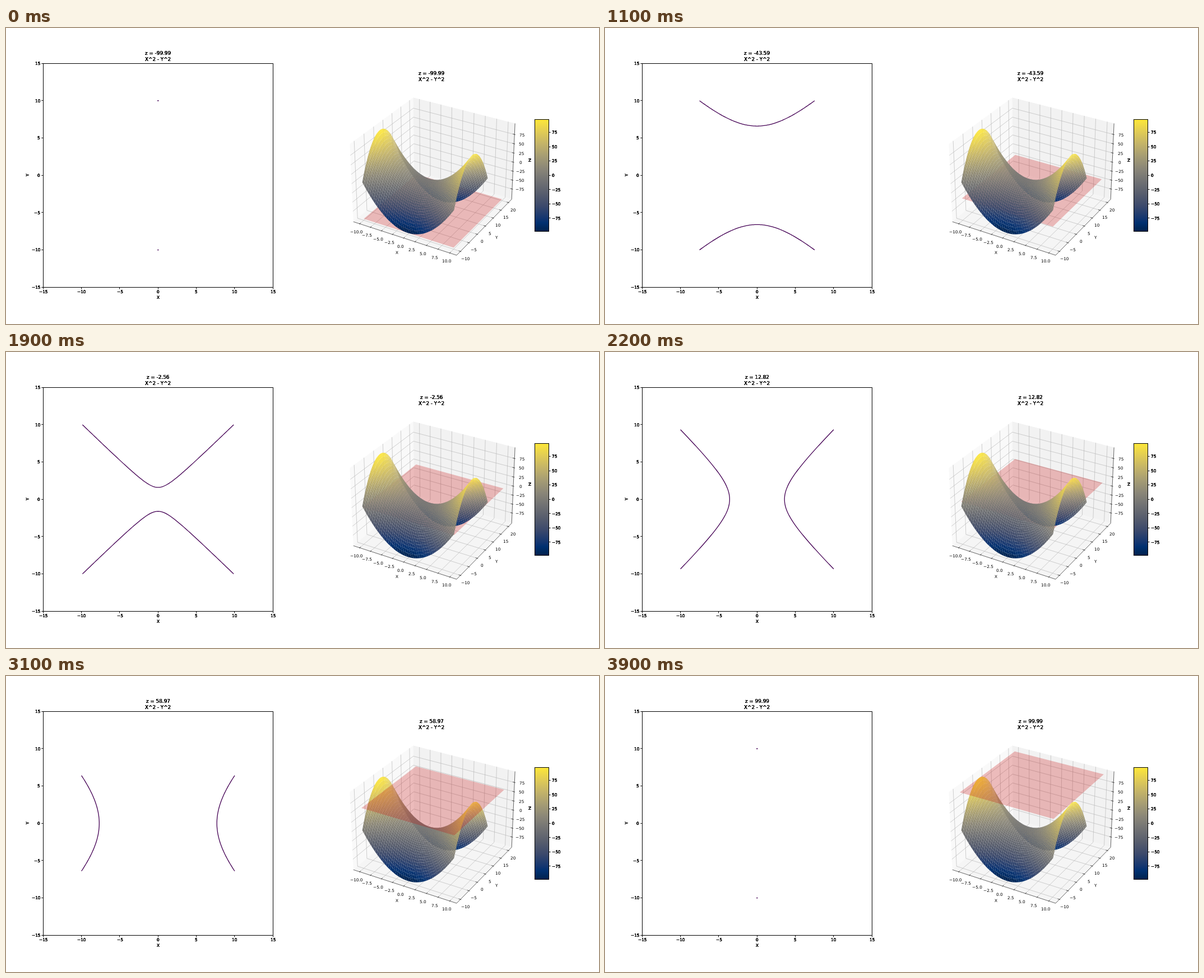
An HTML page with a canvas that plays this animation: 1058 px wide and 529 px high, repeating every 4000 ms.

```html
<!DOCTYPE html>
<html lang="en">
<head>
<meta charset="utf-8">
<title>Level curves of a saddle</title>
<style>
html, body { margin: 0; width: 100%; height: 100%; overflow: hidden; background: #fff; }
canvas { display: block; }
</style>
</head>
<body>
<canvas id="c" width="1058" height="529"></canvas>
<script>
const ctx = document.getElementById('c').getContext('2d');
const STEPS = 40, STEP_MS = 100, Z_END = 99.99;
const TICK = 7.35, TITLE = 8.82, INK = '#000';

// colour map: position, red, green, blue
const STOPS = [
  [0, 0, 34, 78], [.075, 0, 48, 112], [.111, 18, 53, 112], [.222, 59, 73, 108],
  [.333, 87, 93, 109], [.444, 112, 113, 115], [.556, 138, 134, 120],
  [.667, 165, 156, 116], [.778, 195, 179, 105], [.889, 225, 204, 85], [1, 254, 232, 56]
];
function cividis(t) {
  const k = Math.max(1, STOPS.findIndex(s => s[0] >= t));
  const a = STOPS[k - 1], b = STOPS[k], f = (t - a[0]) / (b[0] - a[0]);
  return `rgb(${[1, 2, 3].map(j => Math.round(a[j] + (b[j] - a[j]) * f))})`;
}

// 3D view: limits, box size, elevation 30 and azimuth -60 degrees
const X = 11.458, Y0 = -12.1875, Y1 = 22.1875, Z = 104.17, SIDE = 1.14288;
const C = Math.sqrt(3) / 2;
function project(x, y, z) {
  const a = x / (2 * X) * SIDE, b = (y - 5) / (Y1 - Y0) * SIDE, c = z / (2 * Z) * SIDE * .75;
  const depth = 10 - (.5 * C * a - .75 * b + .5 * c), s = 1847 / depth;
  return [763.5 + s * (C * a + .5 * b), 258.7 - s * (-.25 * a + .5 * C * b + C * c), depth];
}

function trace(points) {
  ctx.beginPath();
  points.forEach(p => ctx.lineTo(p[0], p[1]));
}
function line(points, color, width) {
  trace(points);
  ctx.strokeStyle = color;
  ctx.lineWidth = width;
  ctx.stroke();
}
function fill(points, color) {
  trace(points);
  ctx.closePath();
  ctx.fillStyle = color;
  ctx.fill();
}
const line3 = (points, color) => line(points.map(p => project(...p)), color, .6);
const fill3 = (points, color) => fill(points.map(p => project(...p)), color);

// align: 0 starts at x, .5 is centred, 1 ends at x; y is the middle of the digits
function text(s, x, y, size = TICK, align = .5, passes = 1) {
  ctx.font = `${size}px "DejaVu Sans", sans-serif`;
  ctx.fillStyle = INK;
  const left = Math.round(x - ctx.measureText(s).width * align);
  const base = Math.round(y + size * .365);
  for (let i = 0; i < passes; i++) ctx.fillText(s, left, base);
}
// repeated passes darken the soft edges of the glyphs
const heavy = (s, x, y, size, align) => text(s, x, y, size, align, 4);
const label = (v, digits = 0) => v.toFixed(digits).replace('-', '\u2212');
const range = (a, b, step) => Array.from({ length: Math.round((b - a) / step) + 1 }, (_, i) => a + i * step);

// surface facets, far to near
const grid = [...range(0, 98, 2), 99].map(i => -10 + 20 * i / 99);
const quads = [];
for (let i = 0; i < 50; i++) for (let j = 0; j < 50; j++) {
  const corners = [[i, j], [i + 1, j], [i + 1, j + 1], [i, j + 1]]
    .map(([p, q]) => [grid[p], grid[q], grid[p] ** 2 - grid[q] ** 2]);
  const points = corners.map(p => project(...p));
  quads.push({
    points,
    z: corners.reduce((s, p) => s + p[2], 0) / 4,
    depth: points.reduce((s, p) => s + p[2], 0) / 4
  });
}
quads.sort((a, b) => b.depth - a.depth);
const low = Math.min(...quads.map(q => q.z)), high = Math.max(...quads.map(q => q.z));
const nearest = Math.min(...quads.flatMap(q => q.points.map(p => p[2])));

function drawTitle(z, x, y) {
  heavy('z = ' + +z.toFixed(2), x, y, TITLE);
  heavy('X^2 - Y^2', x, y + 11, TITLE);
}

function drawContour(z) {
  const px = x => 271.3 + x * 13.667, py = y => 263.3 - y * 13.333;
  ctx.strokeStyle = INK;
  ctx.lineWidth = 1;
  ctx.strokeRect(66.5, 63.5, 410, 400);
  for (const v of range(-15, 15, 5)) {
    const x = Math.floor(px(v)) + .5, y = Math.floor(py(v)) + .5;
    line([[x, 464], [x, 466.6]], INK, 1);
    line([[66, y], [63.4, y]], INK, 1);
    heavy(label(v), px(v), 471);
    heavy(label(v), 61, py(v), TICK, 1);
  }
  heavy('X', 271.3, 481.3);
  ctx.save();
  ctx.translate(38, 263);
  ctx.rotate(-Math.PI / 2);
  heavy('Y', 0, 0);
  ctx.restore();

  // levels beyond the sampled range fall back to the lowest one
  const edge = 100 - (10 / 99) ** 2;
  const level = Math.abs(z) > edge ? -edge : z;
  const m = Math.sqrt(100 - Math.abs(level));
  for (const side of [-1, 1]) {
    line(range(-m, m, m / 50).map(u => {
      const v = side * Math.sqrt(u * u + Math.abs(level));
      return level < 0 ? [px(u), py(v)] : [px(v), py(u)];
    }), '#440154', 1.3);
  }
  drawTitle(z, 271.3, 44.7);
}

function drawBox() {
  fill3([[-X, Y0, -Z], [-X, Y1, -Z], [-X, Y1, Z], [-X, Y0, Z]], '#f9f9f9');
  fill3([[-X, Y1, -Z], [X, Y1, -Z], [X, Y1, Z], [-X, Y1, Z]], '#f2f2f2');
  fill3([[-X, Y0, -Z], [X, Y0, -Z], [X, Y1, -Z], [-X, Y1, -Z]], '#f5f5f5');

  const xs = range(-10, 10, 2.5), ys = range(-10, 20, 5), zs = range(-75, 75, 25);
  const gray = '#b0b0b0';
  xs.forEach(x => line3([[x, Y0, -Z], [x, Y1, -Z], [x, Y1, Z]], gray));
  ys.forEach(y => line3([[X, y, -Z], [-X, y, -Z], [-X, y, Z]], gray));
  zs.forEach(z => line3([[-X, Y0, z], [-X, Y1, z], [X, Y1, z]], gray));
  line3([[-X, Y0, -Z], [X, Y0, -Z], [X, Y1, -Z], [X, Y1, Z]], INK);

  const dx = X / 6, dy = (Y1 - Y0) / 12;
  for (const x of xs) {
    line3([[x, Y0 - .1 * dy, -Z], [x, Y0 + .2 * dy, -Z]], INK);
    const p = project(x, Y0, -Z);
    text(label(x, 1), p[0] - 6, p[1] + 14.5);
  }
  for (const y of ys) {
    line3([[X + .1 * dx, y, -Z], [X - .2 * dx, y, -Z]], INK);
    const p = project(X, y, -Z);
    text(label(y), p[0] + 8.5, p[1] + 13);
  }
  for (const z of zs) {
    line3([[X + .1 * dx, Y1, z], [X - .2 * dx, Y1, z]], INK);
    const p = project(X, Y1, z);
    text(label(z), p[0] + 13.5, p[1] + .8);
  }
  text('X', 697.5, 401);
  text('Y', 875.5, 374.5);
  heavy('Z', 935, 236);
}

function drawSurface() {
  for (const q of quads) fill(q.points, cividis((q.z - low) / (high - low)));
}

function drawPlane(z) {
  fill3([[-10, -10, z], [10, -10, z], [10, 20, z], [-10, 20, z]], 'rgba(195,0,0,.25)');
}

function drawColorbar() {
  const g = ctx.createLinearGradient(0, 363, 0, 163);
  STOPS.forEach(([p, ...rgb]) => g.addColorStop(p, `rgb(${rgb})`));
  ctx.fillStyle = g;
  ctx.fillRect(943, 163, 26, 200);
  ctx.strokeStyle = INK;
  ctx.lineWidth = 1;
  ctx.strokeRect(943.5, 163.5, 25, 200);
  for (const v of range(-75, 75, 25)) {
    const y = 263.3 - v * 200 / (high - low);
    line([[969, Math.floor(y) + .5], [971.6, Math.floor(y) + .5]], INK, 1);
    heavy(label(v), 974, y, TICK, 0);
  }
}

function draw(step) {
  const z = -Z_END + 2 * Z_END * step / (STEPS - 1);
  ctx.fillStyle = '#fff';
  ctx.fillRect(0, 0, 1058, 529);
  drawContour(z);
  drawBox();
  // whichever reaches closest to the viewer goes on top
  const order = project(10, -10, z)[2] < nearest ? [drawSurface, drawPlane] : [drawPlane, drawSurface];
  order.forEach(part => part(z));
  drawTitle(z, 759.3, 80.7);
  drawColorbar();
}

let shown = -1;
function tick() {
  const step = Math.floor(performance.now() / STEP_MS) % STEPS;
  if (step !== shown) draw(shown = step);
  requestAnimationFrame(tick);
}
tick();
</script>
</body>
</html>
```
